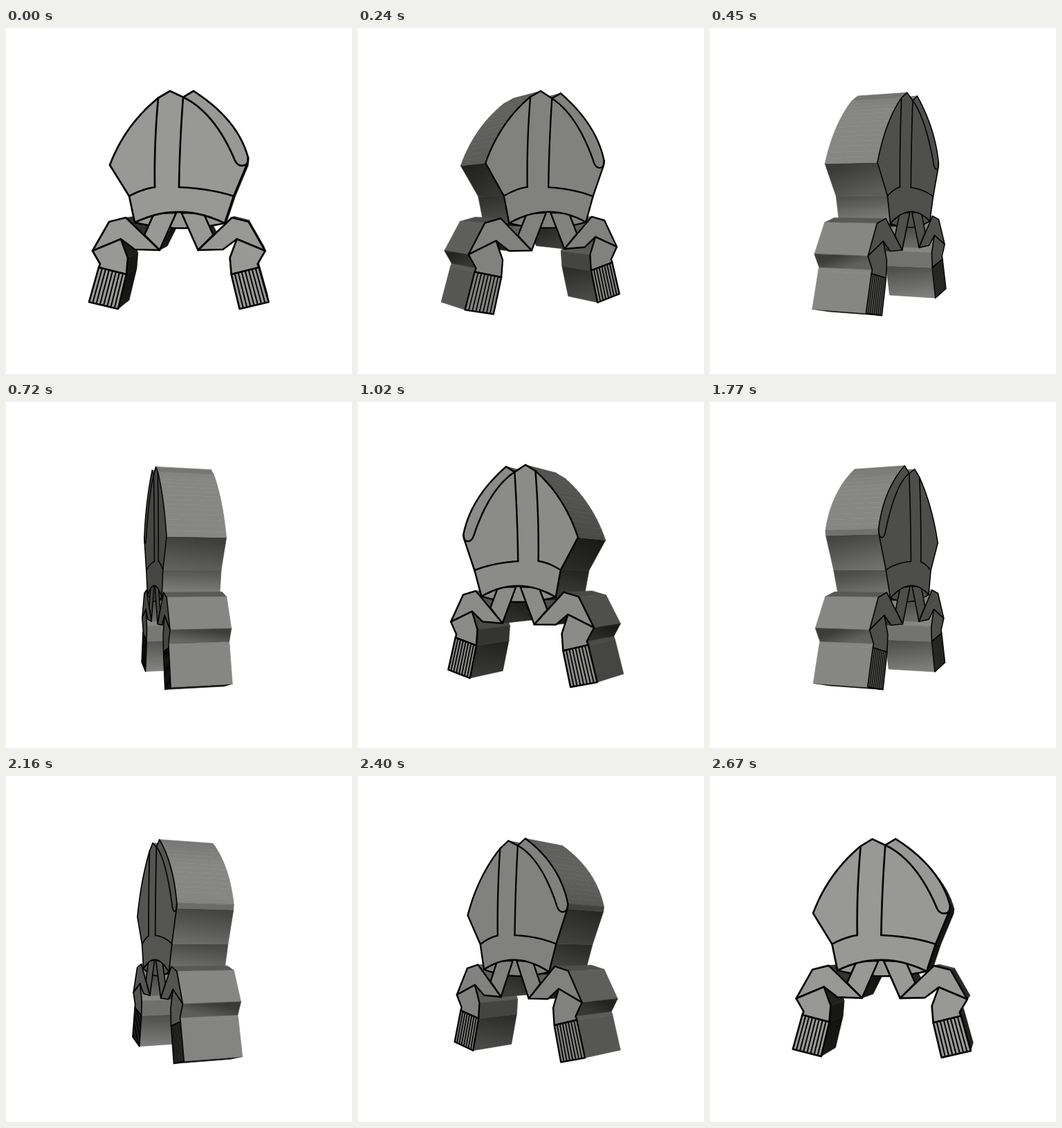
Write an HTML page with a canvas that moves like this. It is 500 px wide and 500 px high and loops after 2700 ms.

```html
<!DOCTYPE html>
<html lang="en">
<head>
<meta charset="utf-8">
<title>Rotating mitre</title>
<style>
  html, body { margin: 0; width: 100%; height: 100%; overflow: hidden; background: #fff; }
  canvas { display: block; width: 500px; height: 500px; }
</style>
</head>
<body>
<canvas id="stage" width="500" height="500"></canvas>
<script>
const ctx = document.getElementById('stage').getContext('2d');

// Off-axis perspective: the lens centre lies to the right of the solid.
const DIST = 950, HALF = 40, SHIFT = 105, AXIS_X = 254.4, AXIS_Y = 249.5;
const NEAR = DIST / (DIST - HALF);
const MID_X = AXIS_X + SHIFT * (1 - NEAR);
const LOOP = 2700, STEP = 30, HALF_TURN = 1200;

// Shapes are drawn as seen from the front, then moved into model space.
const model = ([u, v]) => [(u - MID_X) / NEAR, (v - AXIS_Y) / NEAR];
const shape = pts => pts.map(model);
const mirror = pts => pts.map(([x, y]) => [-x, y]);

function curve(a, c, b, n = 14) {
  return Array.from({ length: n + 1 }, (_, i) => {
    const t = i / n, s = 1 - t;
    return [0, 1].map(k => s * s * a[k] + 2 * s * t * c[k] + t * t * b[k]);
  });
}

// Mitre
const leftTop = [220, 101], notch = [256, 100], peak = [237, 91], peak2 = [271, 91];
const leftMost = [150, 198], bandL = [178, 243], bandR = [329, 243];
const hemL = [186, 281], hemR = [316, 282];
const leftSide = curve(leftTop, [172, 140], leftMost);
const rim = curve(peak2, [336, 133], [350, 188]);
const hem = curve(hemL, [250, 250], hemR);
const opening = curve(hemL, [250, 297], hemR);

const upper = [peak, notch, peak2, ...rim, [349, 195], bandR, hemR];
const lower = [bandL, leftMost, ...leftSide.slice().reverse(), peak];
const hatSides = shape([...upper, ...opening.slice().reverse(), ...lower]);
const hat = shape([...upper, ...hem.slice().reverse(), ...lower]);
const lens = shape([...hem, ...opening.slice().reverse()]);

const seams = [
  curve(leftTop, [214, 165], [215, 230]),
  curve(notch, [251, 165], [250, 230]),
  curve(bandL, [196, 233], [215, 230]),
  curve([250, 230], [295, 232], bandR),
  [...curve(notch, [300, 121], [329, 187]),
   ...curve([329, 187], [333, 199], [341, 199], 6),
   ...curve([341, 199], [350, 199], [350, 188], 6)]
].map(shape);

// Left ribbon; the right one is its mirror image.
const elbow = [125, 322], fold = [166, 305], cuffL = [134, 346], cuffR = [174, 356];
const endL = [120, 396], endR = [162, 406], tip = [222, 321];
const ribbonSides = shape([[206, 287], [200, 299], [173, 274], [149, 280], elbow, [136, 341],
  cuffL, endL, endR, cuffR, [176, 332], fold, [186, 320], tip, [238, 289]]).reverse();
const ribbon = [
  [[214, 268], [246, 267], tip, [200, 299]],
  [elbow, [149, 280], [173, 274], tip, [186, 320], fold],
  [elbow, fold, [176, 332], cuffR, cuffL, [136, 341]],
  [cuffL, cuffR, endR, endL]
].map(shape);

const lerp = (a, b, t) => [a[0] + (b[0] - a[0]) * t, a[1] + (b[1] - a[1]) * t];
const FRINGES = 7;
const fringe = Array.from({ length: FRINGES }, (_, i) => {
  const t = (i + 1) / (FRINGES + 1);
  return shape([lerp(cuffL, cuffR, t), lerp(endL, endR, t)]);
});

// Walls of the solid, one per outline edge, with outward normals.
function walls(pts, closed) {
  const out = [];
  const last = closed ? pts.length : pts.length - 1;
  for (let i = 0; i < last; i++) {
    let a = pts[i], b = pts[(i + 1) % pts.length];
    const dx = b[0] - a[0], dy = b[1] - a[1], len = Math.hypot(dx, dy);
    if (len < 0.01) continue;
    const nx = dy / len, ny = -dx / len;
    if (a[1] > b[1]) [a, b] = [b, a];
    out.push({ a, b, nx, ny, mx: (a[0] + b[0]) / 2, my: (a[1] + b[1]) / 2 });
  }
  return out;
}
const sides = [
  ...walls(hatSides, true),
  ...walls(ribbonSides, false),
  ...walls(mirror(ribbonSides).reverse(), false)
];

let sin = 0, cos = 1;

function project([x, y], z) {
  const s = DIST / (DIST + x * sin - z * cos);
  return [AXIS_X + (x * cos + z * sin) * s + SHIFT * (1 - s), AXIS_Y + y * s];
}

function trace(pts, closed) {
  ctx.beginPath();
  pts.forEach(p => ctx.lineTo(p[0], p[1]));
  if (closed) ctx.closePath();
}

const grey = v => {
  const g = Math.round(Math.max(0, Math.min(255, v)));
  return `rgb(${g},${g},${Math.max(0, g - 1)})`;
};

function drawWall(w) {
  const quad = [project(w.a, HALF), project(w.b, HALF), project(w.b, -HALF), project(w.a, -HALF)];
  // Light from the viewer and from above
  const light = Math.max(0, -w.nx * sin * 0.98 - w.ny * (w.ny < 0 ? 0.5 : 0.28));
  const tone = 22 + 112 * Math.pow(Math.min(1, light), 1.5);
  let paint = grey(tone);
  if (w.ny > 0.2 && w.b[1] - w.a[1] > 10) {
    const p = lerp(quad[0], quad[3], 0.5), q = lerp(quad[1], quad[2], 0.5);
    paint = ctx.createLinearGradient(p[0], p[1], q[0], q[1]);
    paint.addColorStop(0, grey(tone * 0.75));
    paint.addColorStop(1, grey(tone * 1.2));
  }
  trace(quad, true);
  ctx.fillStyle = ctx.strokeStyle = paint;
  ctx.lineWidth = 0.6;
  ctx.fill();
  ctx.stroke();
}

function drawCap(z) {
  const facing = Math.abs(cos);
  const line = 1 + 1.7 * facing;
  ctx.fillStyle = grey(34 + 118 * facing);
  ctx.strokeStyle = '#040404';
  const panel = (pts, closed = true, width = line) => {
    trace(pts.map(p => project(p, z)), closed);
    if (closed) ctx.fill();
    ctx.lineWidth = width;
    ctx.stroke();
  };
  panel(lens);
  for (const side of [p => p, mirror]) {
    ribbon.forEach(p => panel(side(p)));
    fringe.forEach(p => panel(side(p), false, 0.5 + 1.5 * facing));
  }
  panel(hat);
  seams.forEach(p => panel(p, false));
}

function draw(t) {
  const deg = t < HALF_TURN ? t * 180 / HALF_TURN
    : 180 + (t - HALF_TURN) * 180 / (LOOP - HALF_TURN);
  sin = Math.sin(deg * Math.PI / 180);
  cos = Math.cos(deg * Math.PI / 180);

  // Camera in model space
  const camX = SHIFT * cos - DIST * sin;
  const camZ = SHIFT * sin + DIST * cos;

  ctx.fillStyle = '#fff';
  ctx.fillRect(0, 0, 500, 500);
  ctx.lineJoin = 'round';
  ctx.lineCap = 'round';

  const range = w => Math.hypot(w.mx - camX, w.my);
  sides
    .filter(w => w.nx * (camX - w.mx) - w.ny * w.my > 0)
    .sort((p, q) => range(q) - range(p))
    .forEach(drawWall);
  if (Math.abs(camZ) > HALF) drawCap(Math.sign(camZ) * HALF);
}

const start = performance.now();
function tick() {
  const t = (performance.now() - start) % LOOP;
  draw(Math.floor(t / STEP) * STEP);
  requestAnimationFrame(tick);
}
tick();
</script>
</body>
</html>
```
